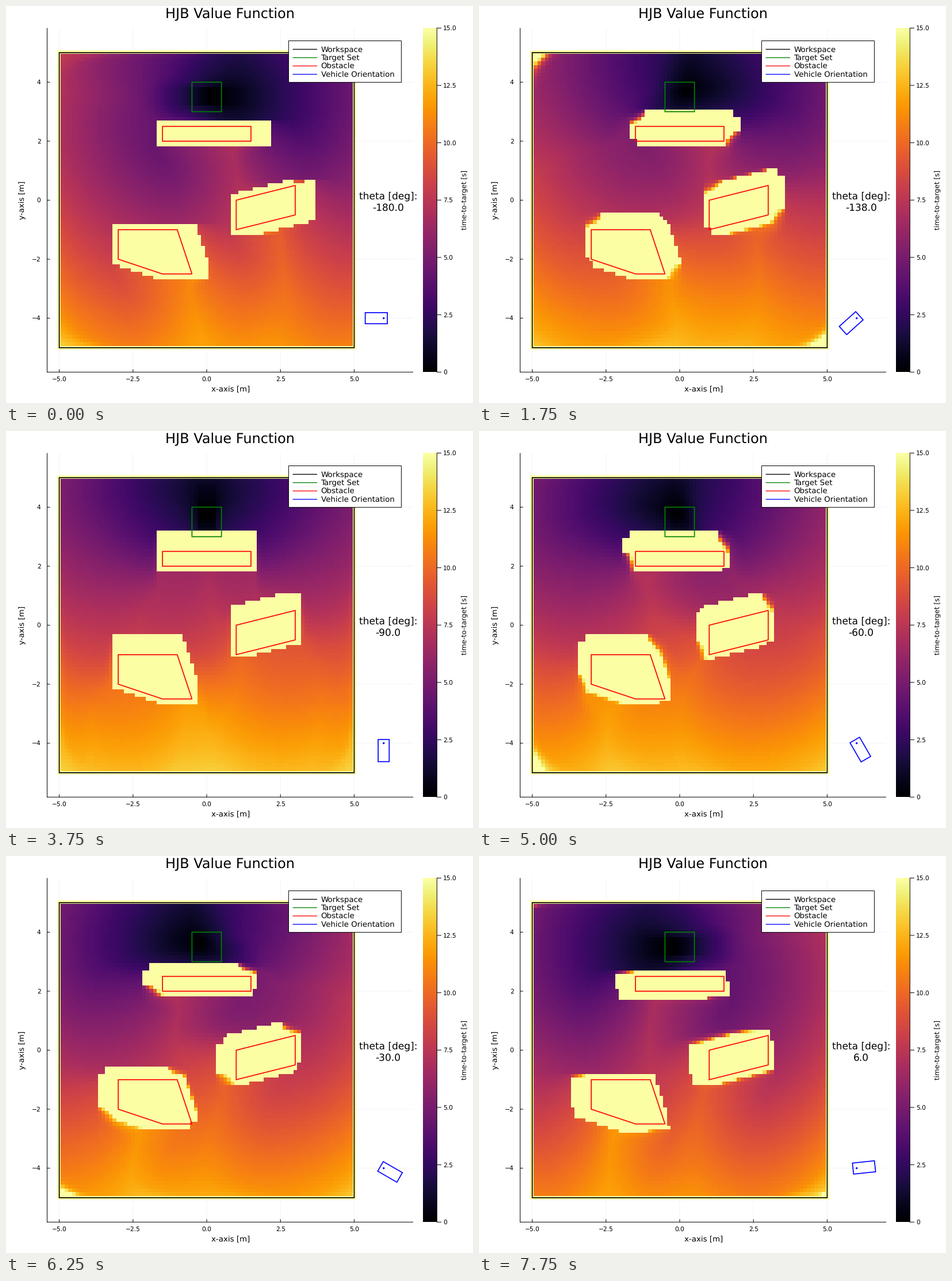
A matplotlib script for the animation above (8 s loop, 812 by 690 pixels).

```python
import numpy as np
import matplotlib.pyplot as plt
from matplotlib.animation import FuncAnimation
from matplotlib.patches import Circle, Polygon, Rectangle

W, H, DPI = 812, 690, 64
PT = 72 / DPI                      # points per pixel
FRAMES, INTERVAL = 32, 250

# Vehicle model and grid
V_FWD, V_BACK = 1.0, 0.5
RADIUS = 0.5 / np.tan(0.5)
FRONT, REAR, HALF = 0.625, -0.125, 0.1875
CORNERS = [(FRONT, HALF), (FRONT, -HALF), (REAR, -HALF), (REAR, HALF)]
N, K, STEP = 81, 60, 0.125
BLOCKED, T_MAX = 50.0, 15.0

# Convex polygons, counter-clockwise
WORKSPACE = [(-5, -5), (5, -5), (5, 5), (-5, 5)]
TARGET = [(-0.5, 3), (0.5, 3), (0.5, 4), (-0.5, 4)]
OBSTACLES = [
    [(-1.5, 2), (1.5, 2), (1.5, 2.5), (-1.5, 2.5)],
    [(1, -1), (3, -0.5), (3, 0.5), (1, 0)],
    [(-3, -2), (-1.5, -2.5), (-0.5, -2.5), (-1, -1), (-3, -1)],
]


def inside(poly, x, y):
    hit = True
    for (x0, y0), (x1, y1) in zip(poly, poly[1:] + poly[:1]):
        hit = hit & ((x1 - x0) * (y - y0) - (y1 - y0) * (x - x0) >= -1e-9)
    return hit


def heading(k):
    return -180.0 + 360.0 / K * k


def body(x, y, theta):
    """Corner positions of the vehicle with its axle at (x, y)."""
    c, s = np.cos(theta), np.sin(theta)
    return [(x + a * c - b * s, y + a * s + b * c) for a, b in CORNERS]


def solve(sweeps=500):
    """Time to target on the (heading, x, y) grid, by upwind value iteration."""
    axis = np.linspace(-5, 5, N)
    theta = np.radians(heading(np.arange(K)))[:, None, None]
    points = body(axis[None, :, None], axis[None, None, :], theta)
    hit = np.zeros((K, N, N), bool)
    goal = np.ones((K, N, N), bool)
    for x, y in points:
        goal &= inside(TARGET, x, y)
        for poly in OBSTACLES:
            hit |= inside(poly, x, y)

    floor = np.where(hit, BLOCKED, 0).astype(np.float32)[:, 1:-1, 1:-1]
    u = np.where(goal, 0, BLOCKED).astype(np.float32)
    cos = np.abs(np.cos(theta)).astype(np.float32)
    sin = np.abs(np.sin(theta)).astype(np.float32)
    turn = np.float32(STEP / (RADIUS * 2 * np.pi / K))
    straight_gain = 1 / (cos + sin)
    turn_gain = 1 / (cos + sin + turn)
    t_fwd, t_back = np.float32(STEP / V_FWD), np.float32(STEP / V_BACK)
    mid = slice(1, N - 1)

    def shifted(d):
        return slice(1 + d, N - 1 + d)

    size = K // 4
    quadrants = [(-1, -1), (1, -1), (1, 1), (-1, 1)]
    for _ in range(sweeps):
        for q, (sx, sy) in enumerate(quadrants):
            ks = slice(q * size, (q + 1) * size)
            idx = np.arange(q * size, (q + 1) * size)
            block, c, s = u[ks], cos[ks], sin[ks]
            fwd = c * block[:, shifted(sx), mid] + s * block[:, mid, shifted(sy)]
            back = c * block[:, shifted(-sx), mid] + s * block[:, mid, shifted(-sy)]
            move = np.minimum(fwd + t_fwd, back + t_back)
            spin = np.minimum(u[(idx + 1) % K, 1:-1, 1:-1],
                              u[(idx - 1) % K, 1:-1, 1:-1])
            best = np.minimum(move * straight_gain[ks],
                              (move + turn * spin) * turn_gain[ks])
            core = block[:, mid, mid]
            np.minimum(core, np.maximum(best, floor[ks]), out=core)
    return u


def px(x):
    return 349.0 + 51.28 * x


def py(y):
    return 337.5 - 51.28 * y


def to_px(points):
    return [(px(x), py(y)) for x, y in points]


value = solve()

plt.rcParams["font.family"] = "DejaVu Sans"
plt.rcParams["text.hinting"] = "none"
plt.rcParams["path.snap"] = False
fig = plt.figure(figsize=(W / DPI, H / DPI), dpi=DPI, facecolor="white")
ax = fig.add_axes([0, 0, 1, 1])
ax.axis("off")


def line(x, y, color="black", width=1.0, z=3):
    ax.plot(x, y, color=color, lw=width * PT, zorder=z, solid_capstyle="butt")


def text(x, y, s, size, ha="center", va="baseline", **kw):
    return ax.text(x, y, s, fontsize=size * PT, ha=ha, va=va, zorder=8, **kw)


def outline(points, color, z=4):
    shape = Polygon(to_px(points), closed=True, fill=False, ec=color,
                    lw=1.7 * PT, zorder=z)
    return ax.add_patch(shape)


LEFT, RIGHT, TOP, BOTTOM = 71.5, 708, 38.3, 636.3
GRID = "#f1f1f1"

# Axes, grid and ticks
for x in (-5, -2.5, 0, 2.5, 5):
    line([px(x)] * 2, [TOP, BOTTOM], GRID, 0.8, 0)
    line([px(x)] * 2, [BOTTOM - 5, BOTTOM])
    text(px(x), 651.7, f"{x:.1f}".replace("-", "\u2212"), 10.67)
for y in (-4, -2, 0, 2, 4):
    line([LEFT, RIGHT], [py(y)] * 2, GRID, 0.8, 0)
    line([LEFT, LEFT + 5], [py(y)] * 2)
    text(60.5, py(y) + 3.8, str(y).replace("-", "\u2212"), 10.67, ha="right")
line([LEFT, LEFT], [TOP, BOTTOM + 0.5])
line([LEFT - 0.5, RIGHT], [BOTTOM, BOTTOM])

text(389.8, 21, "HJB Value Function", 24)
text(390.3, 670.4, "x-axis [m]", 13.33)
text(28.5, 337, "y-axis [m]", 13.33, va="center", rotation=90)

# Value map
edge = 5 + STEP / 2
heat = ax.imshow(value[0].T, cmap="inferno", vmin=0, vmax=T_MAX, origin="lower",
                 extent=(px(-edge), px(edge), py(-edge), py(edge)),
                 interpolation="nearest", aspect="auto", zorder=1)

# Colour bar
ax.imshow(np.linspace(0, 1, 256)[:, None], cmap="inferno", origin="lower",
          extent=(725, 749, BOTTOM, TOP), interpolation="nearest",
          aspect="auto", zorder=1)
line([749.3, 749.3], [TOP - 0.5, BOTTOM + 0.5])
for t in np.arange(0, 15.1, 2.5):
    y = BOTTOM - t / T_MAX * (BOTTOM - TOP)
    line([749.3, 757], [y, y])
    text(760, y + 3.9, f"{t:.1f}" if t else "0", 10.67, ha="left")
text(797, 337.5, "time-to-target [s]", 12, va="center", rotation=90)

# Outlines and vehicle
outline(WORKSPACE, "black")
outline(TARGET, "green")
for poly in OBSTACLES:
    outline(poly, "red")
car = outline(body(6, -4, -np.pi), "blue")
ax.add_patch(Circle((px(6), py(-4)), 1.7, color="blue", lw=0, zorder=5))

# Legend
ax.add_patch(Rectangle((491.4, 60.5), 196, 72.2, fc="white", ec="black",
                       lw=PT, zorder=6))
entries = [("Workspace", "black"), ("Target Set", "green"),
           ("Obstacle", "red"), ("Vehicle Orientation", "blue")]
for i, (name, color) in enumerate(entries):
    y = 75.3 + 14.45 * i
    line([498.5, 541], [y, y], color, 1.3, 7)
    text(547.5, y + 4.8, name, 13.33, ha="left")

text(665, 336.6, "theta [deg]:", 17)
angle = text(664.5, 355.3, "", 17)

ax.set_xlim(0, W)
ax.set_ylim(H, 0)


def update(n):
    theta = heading(n)
    heat.set_data(value[n].T)
    car.set_xy(to_px(body(6, -4, np.radians(theta))))
    angle.set_text(f"{theta:.1f}")
    return heat, car, angle


anim = FuncAnimation(fig, update, frames=FRAMES, interval=INTERVAL,
                     repeat=True, repeat_delay=0)
plt.show()
```
